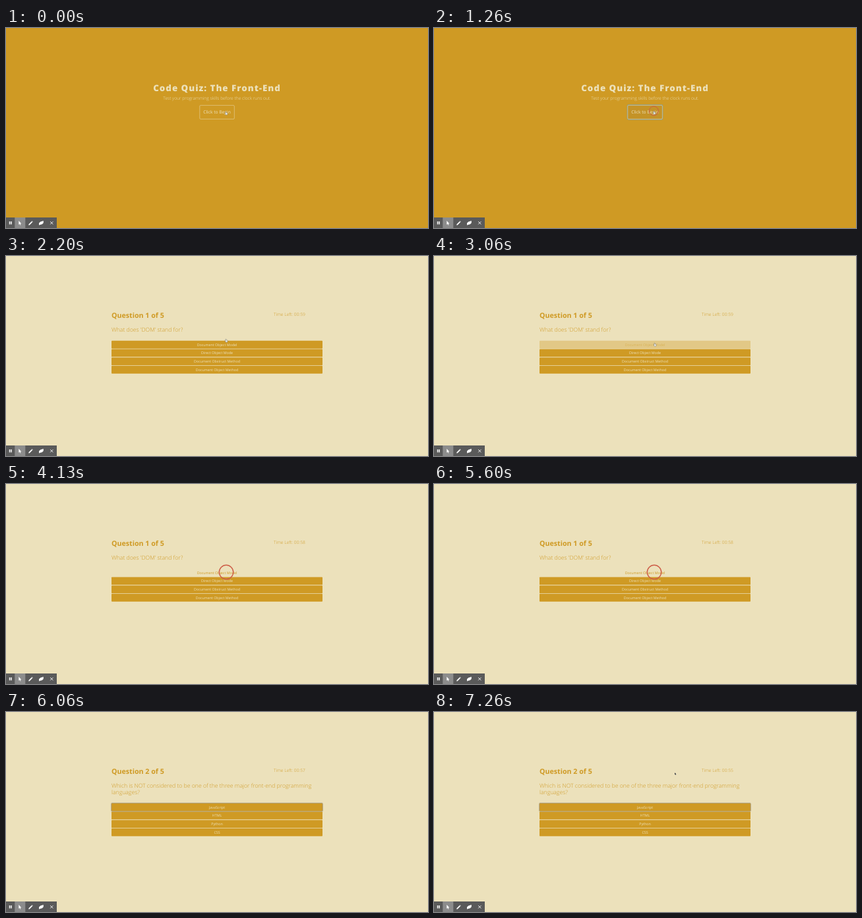
Write an HTML page that moves like this. It is 640 px wide and 304 px high and loops after 8 s.

```html
<!DOCTYPE html>
<html lang="en">
<head>
<meta charset="utf-8">
<title>Code Quiz</title>
<style>
  :root { --gold: #cf9a24; --cream: #ece1bb; }
  html, body { margin: 0; width: 100%; height: 100%; overflow: hidden; background: var(--gold); }
  svg { display: block; }
  text { font-family: "Open Sans", sans-serif; text-rendering: geometricPrecision; }
  .mid { text-anchor: middle; }
  .gold { fill: var(--gold); }
  .cream { fill: var(--cream); }
  .title { font-size: 13.33px; font-weight: 800; letter-spacing: 1px; }
  .small { font-size: 6.67px; font-weight: 300; }
  .label { font-size: 6.67px; }
  .heading { font-size: 10.67px; font-weight: 700; }
  .question { font-size: 8.67px; font-weight: 300; }
  .option { font-size: 5.33px; }

  /* Every animation shares one 8 s loop; percentages are ms / 80. */
  .intro, .quiz, .first, .second, .digits, .hand, .arrow, .ring { animation: 8s step-end infinite; }
  .intro { animation-name: intro; }
  .quiz { animation-name: quiz; }
  .first { animation-name: first; }
  .second { animation-name: second; }
  .digits { animation-name: count; }
  .hand { animation-name: hand; }
  .arrow { animation-name: arrow; }
  .ring { fill: none; stroke: #cd5c47; }
  .ring.a { animation-name: press-a; }
  .ring.b { animation-name: press-b; }
  .hover { animation: hover 8s infinite; }
  .fade-bg { animation: fade-bg 8s infinite; }
  .fade-text { animation: fade-text 8s infinite; }

  @keyframes intro { 0% { visibility: visible } 16.625%, 100% { visibility: hidden } }
  @keyframes quiz { 0% { visibility: hidden } 16.625%, 100% { visibility: visible } }
  @keyframes first { 0% { visibility: hidden } 16.625% { visibility: visible } 72.5%, 100% { visibility: hidden } }
  @keyframes second { 0% { visibility: hidden } 72.5%, 100% { visibility: visible } }
  @keyframes count {
    0% { transform: none }
    27.5% { transform: translateY(-10px) }
    40% { transform: translateY(-20px) }
    72.5% { transform: translateY(-30px) }
    77.5% { transform: translateY(-40px) }
    90%, 100% { transform: translateY(-50px) }
  }
  @keyframes hover { 0%, 8% { opacity: 0; animation-timing-function: ease } 13.25%, 100% { opacity: 1 } }
  @keyframes fade-bg {
    0%, 36.375% { fill: var(--gold); animation-timing-function: ease }
    41.375%, 100% { fill: var(--cream) }
  }
  @keyframes fade-text {
    0%, 36.375% { fill: var(--cream); animation-timing-function: ease }
    41.375%, 100% { fill: var(--gold) }
  }
  @keyframes hand {
    0% { transform: translate(333px, 127.3px); visibility: visible }
    1.25% { transform: translate(333px, 126.4px) }
    36.625% { transform: translate(334px, 132.4px); visibility: visible }
    45%, 100% { transform: translate(334px, 132.4px); visibility: hidden }
  }
  @keyframes arrow {
    0% { transform: translate(334px, 132px); visibility: hidden }
    80.75% { transform: translate(334px, 132px); visibility: visible; animation-timing-function: ease-in-out }
    84.125%, 100% { transform: translate(365px, 92px); visibility: visible }
  }
  @keyframes press-a {
    0% { r: 3px; visibility: hidden }
    15% { r: 4px; visibility: visible; animation-timing-function: linear }
    15.75% { r: 7px; visibility: visible }
    16.625%, 100% { r: 7px; visibility: hidden }
  }
  @keyframes press-b {
    0% { r: 4px; visibility: hidden }
    47.5% { r: 4px; visibility: visible; animation-timing-function: ease-out }
    50% { r: 10.7px; visibility: visible }
    72.5%, 100% { r: 10.7px; visibility: hidden }
  }
</style>
</head>
<body>
<svg width="100%" height="100%" viewBox="0 0 640 304">
  <g class="intro">
    <rect width="640" height="304" class="gold"/>
    <text class="title cream mid" x="320" y="96">Code Quiz: The Front-End</text>
    <text class="small cream mid" x="320" y="109.3">Test your programming skills before the clock runs out.</text>
    <g class="hover">
      <rect x="293.3" y="117" width="53.4" height="22" rx="1.5" fill="#c49327" stroke="#8e9d86" stroke-width="1.3"/>
    </g>
    <rect x="293.8" y="117.6" width="52.5" height="20.8" rx="1.3" fill="none" stroke="#ece1bb" stroke-opacity=".7" stroke-width=".7"/>
    <text class="label cream mid" x="320" y="130.3">Click to Begin</text>
  </g>

  <g class="quiz">
    <rect width="640" height="304" class="cream"/>
    <text class="small gold" x="406" y="90.7">Time Left: 00:</text>
    <svg x="440" y="84" width="20" height="9">
      <g class="digits small gold" id="digits"></g>
    </svg>
  </g>

  <g class="first">
    <text class="heading gold" x="160" y="93.8">Question 1 of 5</text>
    <text class="question gold" x="160" y="115">What does 'DOM' stand for?</text>
    <g id="options1"></g>
  </g>

  <g class="second">
    <text class="heading gold" x="160" y="93.8">Question 2 of 5</text>
    <text class="question gold" x="160" y="115">Which is NOT considered to be one of the three major front-end programming</text>
    <text class="question gold" x="160" y="125">languages?</text>
    <g id="options2"></g>
    <rect x="159.7" y="138.4" width="320.6" height="12.6" rx="1" fill="none" stroke="#9b8f70" stroke-width=".8"/>
  </g>

  <g class="hand">
    <path d="M0 0l.9.2.3 1.2 1.8.5.1 1.6-.7 1.2H.6L-1 2.8l.2-.6.9.2z" fill="#f4f2ec" stroke="#59606a" stroke-width=".45"/>
  </g>
  <g class="arrow">
    <path d="M0 0v3.6l.9-.8.6 1.3.6-.3-.6-1.2h1.1z" fill="#222" stroke="#eee" stroke-width=".2"/>
  </g>
  <circle class="ring a" cx="333.3" cy="126" stroke-width="1"/>
  <circle class="ring b" cx="334" cy="134" stroke-width="1.4"/>

  <g fill="#fff">
    <rect y="288" width="77" height="16" fill="#5a5a5a"/>
    <rect x="13.3" y="288" width="16" height="16" fill="#8c8c8c"/>
    <path d="M4.8 294h1.5v4.6H4.8zM7.2 294h1.5v4.6H7.2z"/>
    <path d="M19.3 293v6l1.4-1.2.9 2 .9-.4-.9-1.9h1.8z"/>
    <path d="M34.2 299.8l.3-1.6 4.2-4.2 1.3 1.3-4.2 4.2zM39 293.7l.6-.5 1.2 1.2-.5.6z"/>
    <path d="M50 299.8v-3.2l2.2-2 4.6-1.7v3.3l-2 2-2.8.7z"/>
    <path d="M67.2 294.2l4.2 4.2m0-4.2l-4.2 4.2" stroke="#fff" stroke-width=".9"/>
  </g>
</svg>
<script>
  const byId = id => document.getElementById(id);

  function addOptions(id, top, labels, fadeFirst) {
    byId(id).innerHTML = labels.map((label, i) => {
      const y = top + i * 12.667;
      const fades = fadeFirst && i === 0;
      return `<rect class="${fades ? "fade-bg" : "gold"}" x="160" y="${y}" width="320" height="11.9" rx=".9"/>
        <text class="option mid ${fades ? "fade-text" : "cream"}" x="320" y="${y + 7.9}">${label}</text>`;
    }).join("");
  }

  addOptions("options1", 128.8, ["Document Object Model", "Direct Object Mode",
    "Document Obstruct Method", "Document Object Method"], true);
  addOptions("options2", 138.8, ["JavaScript", "HTML", "Python", "CSS"], false);

  byId("digits").innerHTML = ["00", 59, 58, 57, 56, 55]
    .map((n, i) => `<text x="6.2" y="${6.7 + i * 10}">${n}</text>`).join("");
</script>
</body>
</html>
```
